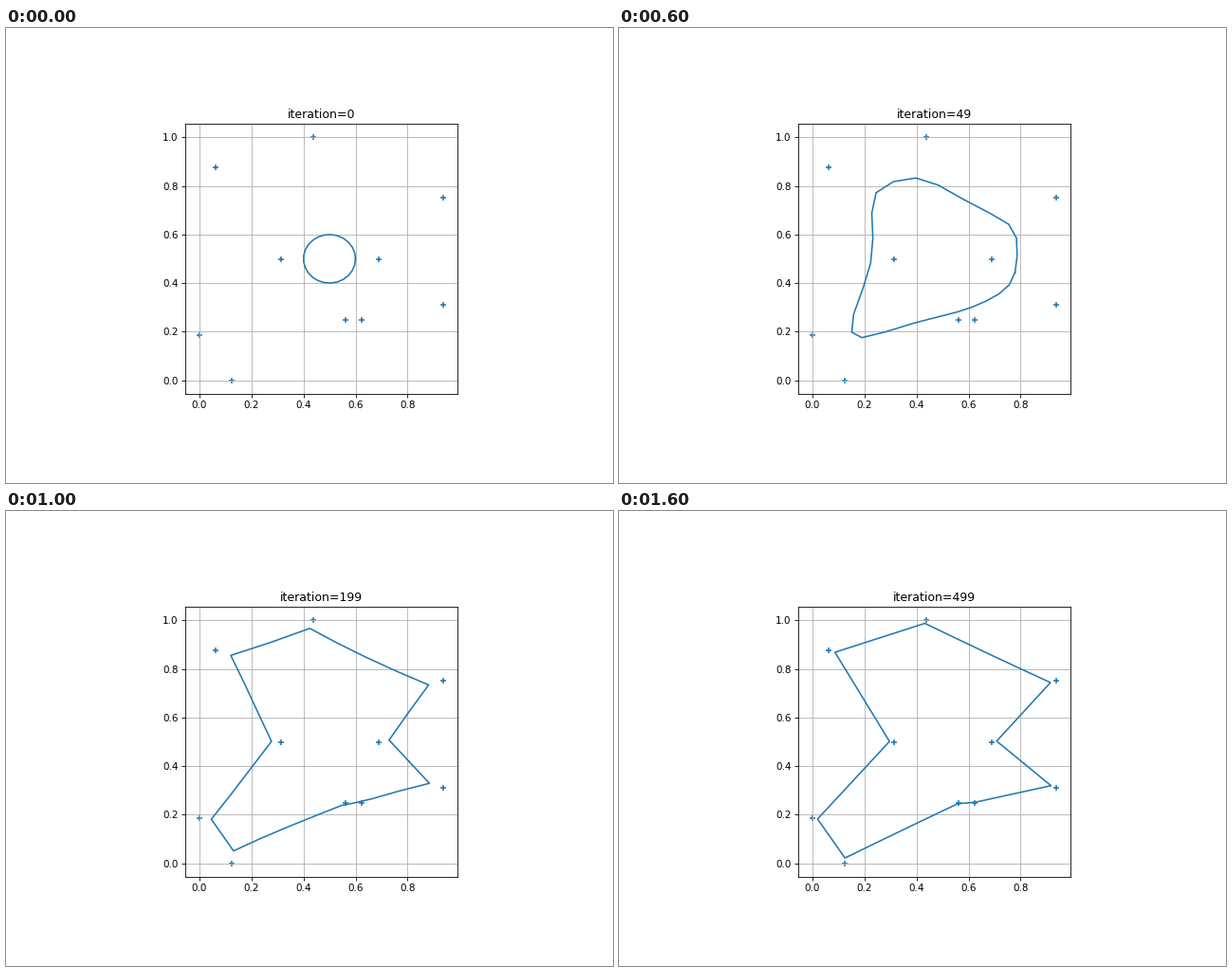
A matplotlib script for the animation above (1800 ms loop, 640 px wide and 480 px high).

```python
import numpy as np
import matplotlib.pyplot as plt
from matplotlib.animation import FuncAnimation

WIDTH, HEIGHT, DPI = 640, 480, 80
S = 75 / DPI  # keeps type and strokes at their 75 dpi size

plt.rcParams.update({
    "font.family": "DejaVu Sans",
    "font.size": 10 * S,
    "axes.titlepad": 6 * S,
    "axes.linewidth": 0.8 * S,
    "grid.linewidth": 0.8 * S,
    "lines.linewidth": 1.5 * S,
})
for axis in ("xtick", "ytick"):
    plt.rcParams.update({
        f"{axis}.major.size": 3.5 * S,
        f"{axis}.major.pad": 3.5 * S,
        f"{axis}.major.width": 0.8 * S,
    })

# Plot box in stage pixels, and pixels per data unit
LEFT, RIGHT, TOP, BOTTOM = 189, 476, 101, 386
X_SCALE, Y_SCALE = 274.3, 256.2

# Elastic net: pull to the cities, tension, and a shrinking radius
ALPHA, BETA = 0.2, 2.0
RADIUS, MIN_RADIUS, DECAY = 0.2, 0.01, 0.99
BEADS = 25
SHOWN = (0, 9, 29, 49, 99, 199, 299, 399, 499)

cities = np.array([
    (0, 3), (1, 14), (2, 0), (5, 8), (7, 16),
    (9, 4), (10, 4), (11, 8), (15, 5), (15, 12),
]) / 16


def relax(net, radius):
    """Move every bead of the closed net by one step."""
    gap = cities[:, None] - net
    dist2 = (gap ** 2).sum(axis=2)
    nearest = dist2.min(axis=1, keepdims=True)
    weight = np.exp((nearest - dist2) / (2 * radius ** 2))
    weight /= weight.sum(axis=1, keepdims=True)
    pull = (weight[..., None] * gap).sum(axis=0)
    tension = np.roll(net, 1, axis=0) - 2 * net + np.roll(net, -1, axis=0)
    return net + ALPHA * pull + BETA * radius * tension


def solve():
    """Return the closed outline for each shown iteration."""
    angle = np.arange(BEADS) * 2 * np.pi / BEADS
    net = 0.5 + 0.1 * np.column_stack([np.cos(angle), np.sin(angle)])
    outlines = []
    for i in range(SHOWN[-1] + 1):
        if i > 0:
            net = relax(net, max(MIN_RADIUS, RADIUS * DECAY ** i))
        if i in SHOWN:
            outlines.append(np.vstack([net, net[:1]]))
    return outlines


outlines = solve()

fig = plt.figure(figsize=(WIDTH / DPI, HEIGHT / DPI), dpi=DPI)
ax = fig.add_axes([LEFT / WIDTH, 1 - BOTTOM / HEIGHT,
                   (RIGHT - LEFT) / WIDTH, (BOTTOM - TOP) / HEIGHT])
ax.scatter(*cities.T, s=26 * S**2, marker="+", linewidths=1.5 * S, color="C0")
line, = ax.plot([], [], color="C0")

# The view is centred on the cities' extent
mid_x, mid_y = (cities.min(axis=0) + cities.max(axis=0)) / 2
half_x = (RIGHT - LEFT) / 2 / X_SCALE
half_y = (BOTTOM - TOP) / 2 / Y_SCALE
ax.set_xlim(mid_x - half_x, mid_x + half_x)
ax.set_ylim(mid_y - half_y, mid_y + half_y)
ax.set_xticks(np.arange(5) / 5)
ax.set_yticks(np.arange(6) / 5)
ax.grid(True)
title = ax.set_title("")


def draw(i):
    line.set_data(*outlines[i].T)
    title.set_text(f"iteration={SHOWN[i]}")
    return line, title


anim = FuncAnimation(fig, draw, frames=len(SHOWN), interval=200, repeat=True)
plt.show()
```
